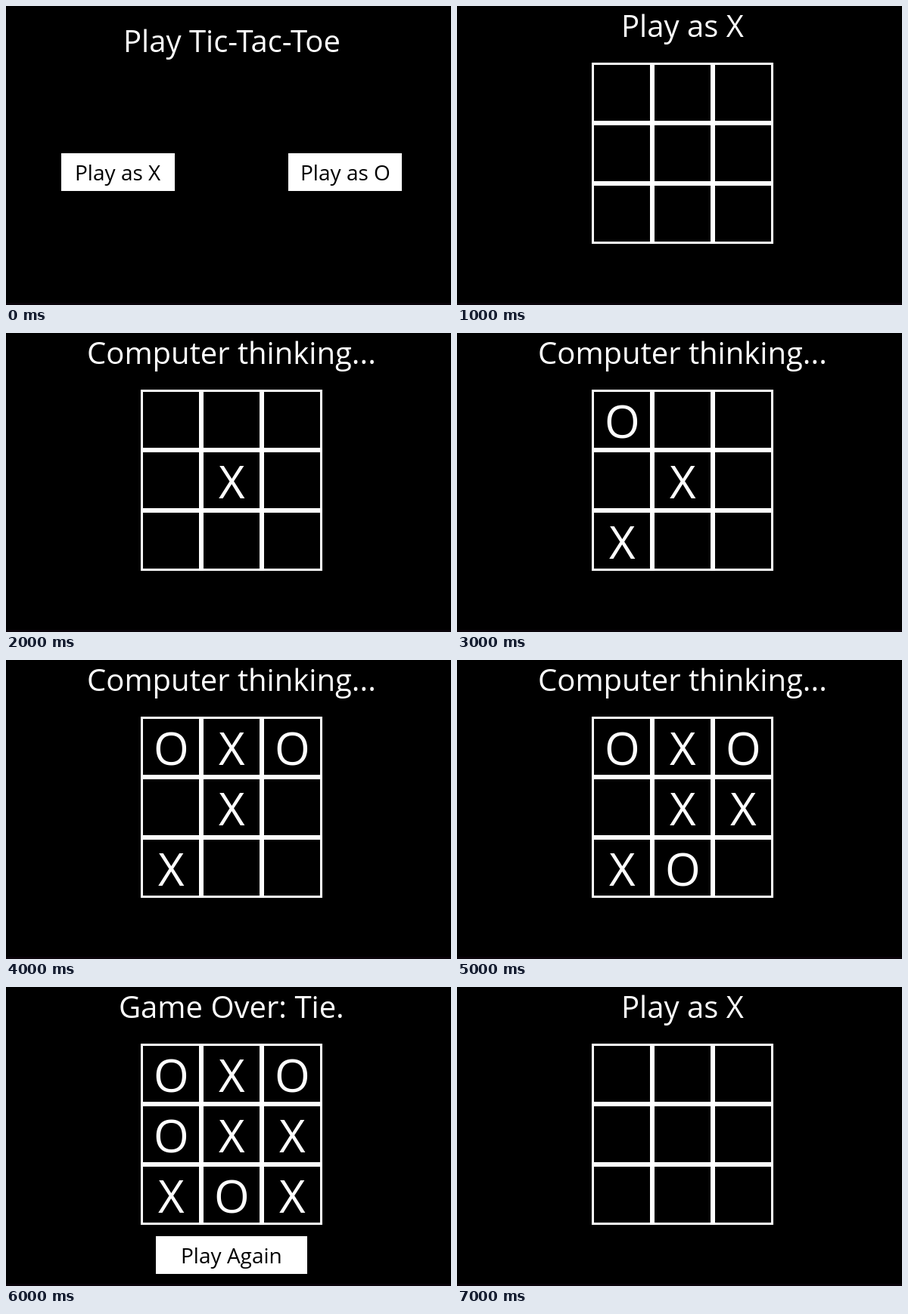
Recreate the animation shown at these times as an HTML page with a canvas. Size 588 by 396 pixels, loop 8000 ms.

```html
<!DOCTYPE html>
<html lang="en">
<head>
<meta charset="utf-8">
<title>Tic-Tac-Toe</title>
<style>
  html, body { margin: 0; width: 100%; height: 100%; overflow: hidden; background: #000; }
  canvas { display: block; }
</style>
</head>
<body>
<canvas id="stage" width="588" height="396"></canvas>
<script>
const ctx = document.getElementById('stage').getContext('2d');
const LOOP = 8000, STEP = 1000, CELL = 80, LEFT = 178, TOP = 75, CENTER = 298;

// One entry per second; board squares are listed row by row.
const scenes = [
  { menu: true },
  { title: 'Play as X',            board: '         ' },
  { title: 'Computer thinking...', board: '    X    ' },
  { title: 'Computer thinking...', board: 'O   X X  ' },
  { title: 'Computer thinking...', board: 'OXO X X  ' },
  { title: 'Computer thinking...', board: 'OXO XXXO ' },
  { title: 'Game Over: Tie.',      board: 'OXOOXXXOX', again: true },
  { title: 'Play as X',            board: '         ' }
];

function text(str, cx, baseline, size, color = '#fff') {
  ctx.font = `${size}px "Open Sans", sans-serif`;
  ctx.fillStyle = color;
  const width = Math.ceil(ctx.measureText(str).width);
  ctx.fillText(str, cx - Math.floor(width / 2), baseline);
}

function button(label, x, y, w) {
  ctx.fillStyle = '#fff';
  ctx.fillRect(x, y, w, 50);
  text(label, x + w / 2, y + 36, 28, '#000');
}

function drawBoard(board) {
  ctx.strokeStyle = '#fff';
  ctx.lineWidth = 3;
  [...board].forEach((mark, i) => {
    const x = LEFT + (i % 3) * CELL;
    const y = TOP + Math.floor(i / 3) * CELL;
    ctx.strokeRect(x + 1.5, y + 1.5, CELL - 3, CELL - 3);
    if (mark !== ' ') text(mark, x + CELL / 2, y + 64, 60);
  });
}

function draw(time) {
  const scene = scenes[Math.floor((time % LOOP) / STEP)];
  ctx.fillStyle = '#000';
  ctx.fillRect(0, 0, 588, 396);
  ctx.fillStyle = '#0a040a';
  ctx.fillRect(0, 393, 588, 3);

  if (scene.menu) {
    text('Play Tic-Tac-Toe', CENTER, 61, 40);
    button('Play as X', 73, 195, 150);
    button('Play as O', 373, 195, 150);
  } else {
    text(scene.title, CENTER, 41, 40);
    drawBoard(scene.board);
    if (scene.again) button('Play Again', 198, 330, 200);
  }
}

const start = performance.now();
function tick() {
  draw(performance.now() - start);
  requestAnimationFrame(tick);
}
tick();
</script>
</body>
</html>
```
